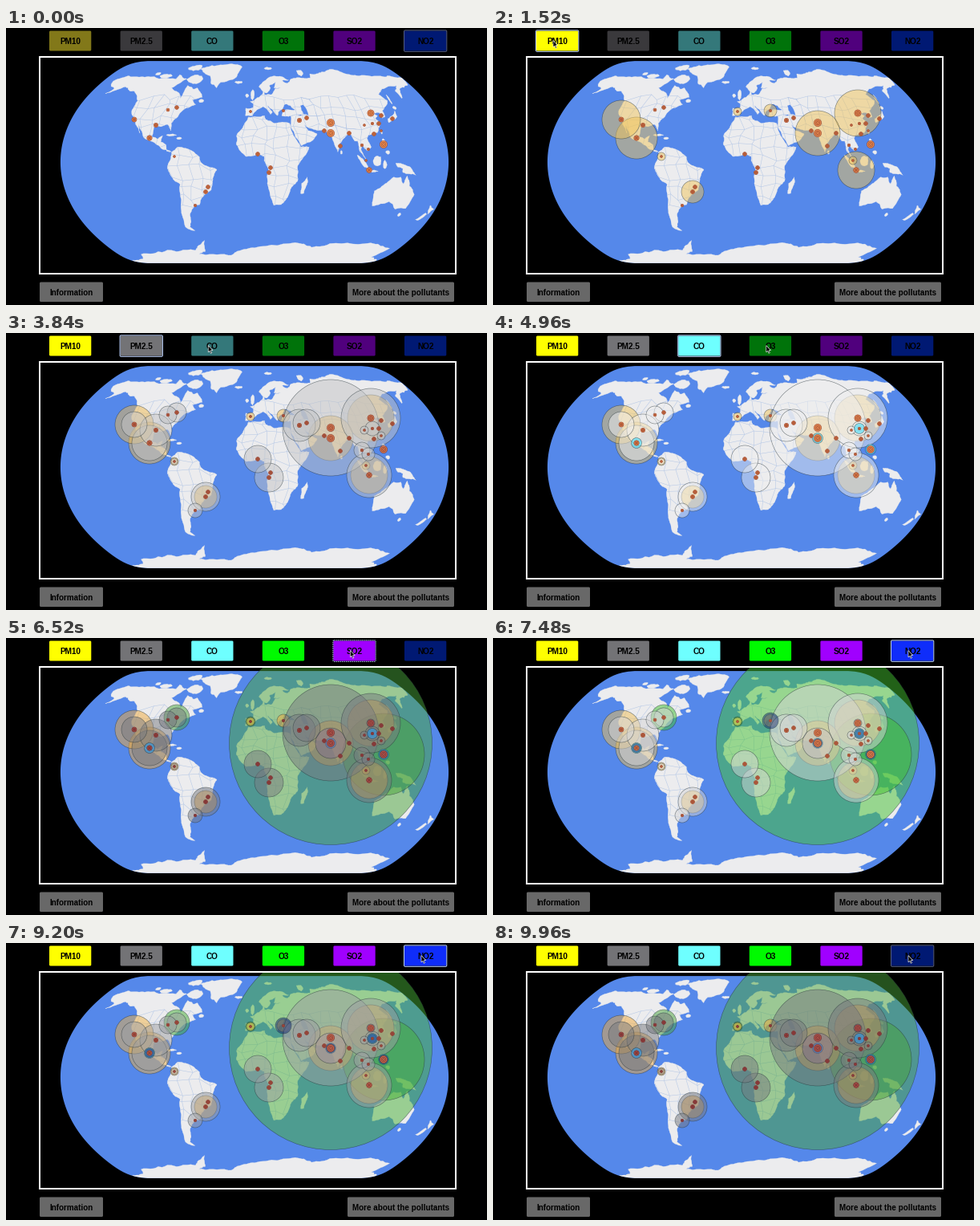
A matplotlib script for the animation above (10000 ms loop, 600x345 px).

```python
import numpy as np
import matplotlib.pyplot as plt
from matplotlib.animation import FuncAnimation
from matplotlib.collections import LineCollection, PatchCollection
from matplotlib.patches import Circle, FancyBboxPatch, Polygon, Rectangle

W, H, DPI = 600, 345, 100
STEP, FRAMES = 40, 250
PX = 72 / DPI
rng = np.random.default_rng(4)

fig = plt.figure(figsize=(W / DPI, H / DPI), dpi=DPI, facecolor="black")
ax = fig.add_axes([0, 0, 1, 1])
ax.set_xlim(0, W)
ax.set_ylim(H, 0)
ax.axis("off")


def rgb(*c):
    return np.array(c) / 255


OCEAN, LAND, BORDER = rgb(85, 136, 234), rgb(236, 236, 238), rgb(178, 198, 230)


def project(points):
    """Natural Earth projection from lon/lat to stage pixels."""
    l, p = np.radians(points).T
    p2 = p * p
    p4 = p2 * p2
    x = l * (0.8707 - 0.131979 * p2
             + p4 * (-0.013791 + p4 * (0.003971 * p2 - 0.001529 * p4)))
    y = p * (1.007226 + p2 * (0.015085 + p4
             * (-0.044475 + 0.028874 * p2 - 0.005916 * p4)))
    return np.column_stack([310 + 88.5 * x, 167 - 88.5 * y])


def rough(points, rounds=3, amount=.1):
    """Midpoint displacement turns a few key points into a coast."""
    for _ in range(rounds):
        step = np.roll(points, -1, axis=0) - points
        size = np.hypot(*step.T)
        push = rng.uniform(-amount, amount, len(points)) * np.minimum(1, 10 / size)
        mid = points + step / 2 + step[:, ::-1] * [-1, 1] * push[:, None]
        points = np.stack([points, mid], axis=1).reshape(-1, 2)
    return points


lats = np.linspace(-90, 90, 91)
rim = np.column_stack([np.full(91, 180), lats])
globe = Polygon(project(np.vstack([rim, -rim])), fc=OCEAN, ec="none")
ax.add_patch(globe)


def border_grid():
    """Jittered lon/lat grid that stands for country borders."""
    lon, lat = np.meshgrid(np.arange(-130, 150, 10.), np.arange(-36, 56, 8.))
    grid = np.stack([lon, lat], axis=-1) + rng.uniform(-3, 3, (*lon.shape, 2))
    rows = [*grid, *grid.transpose(1, 0, 2)]
    return [project(row) for row in rows]


grid = border_grid()


def coast(points, bordered=False):
    patch = Polygon(project(rough(points)), fc=LAND, ec=LAND, lw=.3 * PX)
    ax.add_patch(patch)
    patch.set_clip_path(globe)
    if bordered:
        lines = LineCollection(grid, colors=[BORDER], lw=.5 * PX, zorder=2)
        ax.add_collection(lines, autolim=False)
        lines.set_clip_path(patch)


def land(*coords, bordered=False):
    coast(np.array(coords, float).reshape(-1, 2), bordered)


def island(lon, lat, rx, ry):
    a = np.linspace(0, 2 * np.pi, 8, endpoint=False)
    size = rng.uniform(.85, 1.15, 8)
    coast(np.column_stack([lon + rx * size * np.cos(a), lat + ry * size * np.sin(a)]))


# North America, Greenland, South America
land(-168, 66, -156, 71, -128, 70, -95, 68, -94, 72, -82, 68, -94, 60, -82, 55,
     -79, 51, -77, 62, -69, 59, -65, 60, -56, 52, -66, 50, -61, 46, -70, 43,
     -76, 36, -81, 31, -80, 25, -84, 30, -97, 28, -97, 20, -91, 18.5, -87, 21,
     -88, 16, -83, 14, -82, 9, -77, 8, -85, 10, -95, 16, -105, 20, -113, 31,
     -109, 23, -117, 33, -124, 41, -123, 49, -133, 57, -147, 61, -163, 55,
     -158, 59, -165, 62, bordered=True)
land(-73, 78, -55, 71, -51, 64, -43, 60, -40, 65, -22, 70, -17, 80, -30, 83.5,
     -60, 82)
land(-77, 8, -72, 12, -62, 10.5, -51, 4, -50, 0, -35, -6, -39, -13, -41, -22,
     -48, -26, -54, -34, -58, -35, -65, -41, -66, -47, -69, -52, -65, -55,
     -74, -52, -73, -37, -70, -18, -76, -14, -81, -5, -78, 2, bordered=True)
# Africa
land(-6, 36, 10, 37, 11, 34, 20, 31, 34, 31, 37, 21, 43, 12, 51, 12, 40, -3,
     40.5, -15, 35, -20, 32, -28, 26, -34, 19, -34.5, 12, -17, 13, -6, 9, 1,
     9, 4.5, 2, 6, -8, 4.5, -17, 14, -17, 21, -10, 30, bordered=True)
land(49.3, -12, 50, -16, 47, -25, 44, -25, 44.3, -17)
# Europe
land(-9, 37, -9, 43, -1.5, 43.5, -1, 46, -4.5, 48.5, 2, 51, 8, 54, 10, 57.5,
     11, 54, 19, 54.5, 23.5, 59.5, 29, 60, 38, 64, 44, 68, 60, 69, 60, 45,
     47, 45, 49, 38, 36, 36.6, 27, 37, 29, 41, 41, 41.5, 37, 45, 31, 46, 28, 42,
     24, 40, 23, 37, 19, 41, 13, 45.5, 18, 40, 16, 38, 9, 44.3, 3, 42, -2, 37,
     bordered=True)
land(29, 60, 22, 60, 25, 65, 17, 62, 18, 60, 13, 55.5, 8, 58, 5, 61, 19, 70,
     30, 70.5, 41, 67, 33, 66.5, 38, 64)
# Asia
land(55, 68.5, 68, 69, 70, 73, 87, 75, 104, 77.5, 113, 74, 130, 71, 160, 70,
     180, 69, 177, 62.5, 163, 59, 157, 51, 156, 57, 163, 62, 143, 59, 135, 54.5,
     140, 49, 129, 41, 129, 36, 126, 35, 125, 39.5, 118, 39, 122, 37, 119, 35,
     122, 30, 117, 23.5, 108, 21.6, 90, 25, 70, 28, 53.8, 37, 51, 45, 48, 55,
     bordered=True)
land(108, 22, 106, 19, 109, 12, 105, 9, 100.5, 13.4, 99.3, 10, 104, 1.3,
     98.5, 8, 97, 17, 94, 17, 91, 22.5, 87, 21, 80, 15, 77.5, 8, 72.6, 21,
     67, 25, 57, 26, 48.2, 30, 51.5, 25, 59.5, 22.4, 55, 17.5, 44, 13, 35, 28,
     36, 36.6, 49, 38, 54, 36.8, 62, 40, 90, 30, bordered=True)
land(130.5, 31.5, 136, 33.6, 141, 36, 141.5, 41, 137, 37, 131, 34.4)
land(95.3, 5.6, 104, -1.5, 105.8, -5.8, 102, -4)
# Oceania, Antarctica
land(131, -.8, 138, -1.7, 145, -4.3, 150.5, -10.5, 138, -8.3, 137.8, -5.3, 133, -4)
land(114, -23, 122, -18, 130, -12, 136.5, -12, 140, -17.5, 142.5, -11, 146, -19,
     153, -26, 150, -37, 140, -37.5, 136, -34, 131, -31.5, 116, -35)
land(172.8, -34.5, 178.4, -37.7, 175.2, -41.5, 173.8, -39.3)
land(172.7, -40.6, 174.2, -41.7, 169, -46.6, 166.5, -46)
land(-180, -84.7, -155, -81, -150, -77, -115, -74, -75, -73, -67, -68, -58, -63.5,
     -63, -74, -75, -77, -35, -78, -20, -73.5, 0, -70.5, 55, -66.5, 70, -70,
     90, -66.5, 145, -67, 168, -71, 160, -80, 180, -84.7, 180, -90, -180, -90)

for spot in ((-72, 68, 9, 4), (-110, 71, 7, 2), (-80, 79, 9, 3), (-122, 73, 3, 1.5),
             (-56, 49, 2.5, 1.5), (-79, 21.7, 4.5, .8), (-71, 19, 2.5, .8),
             (-18.5, 65, 4.5, 1.2), (-2, 54, 2, 4), (-8, 53.3, 1.7, 1.5),
             (18, 78.5, 5, 1.5), (58, 74, 4, 3), (143, 43.3, 2, 1.3),
             (142.7, 50, .8, 4), (121, 23.7, .7, 1.4), (80.8, 7.7, .9, 1.5),
             (121.3, 16, 1.5, 2.5), (124, 7.8, 1.8, 1.5), (114, 1, 4, 4),
             (121, -2, 1.7, 3.3), (110, -7.3, 4.5, .8), (146.7, -42, 1.6, 1.4)):
    island(*spot)

box = Rectangle((42.3, 36.3), 518.6, 270, fc="none", ec="white", lw=2 * PX, zorder=6)
ax.add_patch(box)

# City: x, y, then bubble radii for PM10, PM2.5, O3
CITIES = {
    "Los Angeles": (160, 114, 24, 16), "Mexico City": (179, 137, 26, 22),
    "Houston": (187, 121, 0, 20), "Chicago": (202, 102, 0, 11),
    "New York": (213, 99, 0, 12, 16), "Bogota": (210, 160, 5, 4),
    "Sao Paulo": (249, 204, 14, 18), "Buenos Aires": (236, 221, 0, 9),
    "Madrid": (305, 104, 5, 0, 6), "Istanbul": (346, 103, 8),
    "Lagos": (314, 157, 0, 17), "Luanda": (328, 180, 0, 18),
    "Baghdad": (366, 115, 0, 20), "Tehran": (375, 112, 0, 17),
    "Lahore": (405, 118, 0, 60), "Ahmedabad": (405, 131, 28, 0, 126.5),
    "Beijing": (455, 106, 29, 37), "Chengdu": (447, 121, 0, 5),
    "Wuhan": (457, 119, 0, 9), "Taipei": (468, 128, 0, 5),
    "Manila": (471, 145, 0, 0, 51), "Bangkok": (444, 146, 0, 10),
    "Saigon": (452, 151, 0, 8), "Singapore": (449, 165, 5),
    "Jakarta": (453, 177, 23, 28),
}
QUIET = [(428, 131), (397, 128), (417, 147), (465, 119), (468, 109), (482, 113),
         (459, 132), (330, 174), (252, 198)]


def column(k):
    return [(*c[:2], c[k]) for c in CITIES.values() if len(c) > k and c[k]]


def spots(r, *names):
    return [(*CITIES[n][:2], r) for n in names]


# Label, idle and active button, dark and light fill, alpha, click time, bubbles
LAYERS = [
    ("PM10", rgb(130, 120, 25), rgb(255, 255, 0), rgb(240, 170, 60),
     rgb(240, 200, 95), .5, 1320, column(2)),
    ("PM2.5", rgb(58, 57, 60), rgb(115, 115, 118), rgb(118, 120, 126),
     rgb(250, 250, 250), .5, 2640, column(3)),
    ("CO", rgb(52, 120, 122), rgb(110, 255, 255), rgb(40, 150, 230),
     rgb(70, 225, 250), .6, 3920,
     spots(6.5, "Mexico City", "Ahmedabad", "Wuhan", "Manila")),
    ("O3", rgb(0, 115, 10), rgb(0, 250, 0), rgb(75, 165, 60),
     rgb(65, 205, 45), .5, 5160, column(4)),
    ("SO2", rgb(80, 0, 125), rgb(160, 0, 255), rgb(125, 95, 150),
     rgb(235, 230, 240), .35, 6440,
     spots(19, "Ahmedabad") + spots(5, "Beijing", "Manila")),
    ("NO2", rgb(0, 25, 115), rgb(15, 45, 250), rgb(20, 40, 120),
     rgb(30, 60, 120), .5, 7320,
     spots(10, "Istanbul") + spots(5.5, "Mexico City", "Ahmedabad", "Wuhan", "Manila")),
]
OZONE, LAST, NO2_OFF = 3, 5, 9280

# Ozone lies under the other layers, wide bubbles under narrow ones
bubbles = sorted(((x, y, r, k) for k, layer in enumerate(LAYERS)
                  for x, y, r in layer[-1]),
                 key=lambda b: (b[3] != OZONE, b[3], -b[2]))
owner = np.array([b[3] for b in bubbles])
discs = PatchCollection([Circle(b[:2], b[2]) for b in bubbles], lw=.6 * PX, zorder=3)
ax.add_collection(discs, autolim=False)
discs.set_clip_path(box)

# Markers grow with the worst reading of their city
markers = [(x, y, min(1 + max(radii) / 12, 4.6)) for x, y, *radii in CITIES.values()]
markers += [(x, y, 2.4) for x, y in QUIET]
dots = PatchCollection([Circle((x, y), r * s) for x, y, r in markers
                        for s in ((1, .62, .28) if r > 2.3 else (1, .4))],
                       lw=.6 * PX, zorder=4)
ax.add_collection(dots, autolim=False)


def button(x, y, w, h, label, color, size):
    patch = FancyBboxPatch((x, y), w, h, fc=color, ec="none", zorder=7,
                           boxstyle="round,pad=0,rounding_size=1.5")
    ax.add_patch(patch)
    ax.text(x + w / 2, y + h / 2 + .5, label, size=size * PX, weight="bold",
            family="Liberation Sans", ha="center", va="center_baseline", zorder=8)
    return patch


def left(k):
    return 54 + 88.6 * k


buttons = [button(left(k), 3.5, 52.3, 25, layer[0], layer[1], 10)
           for k, layer in enumerate(LAYERS)]
GRAY = rgb(104, 104, 104)
button(42, 316.5, 79, 24.5, "Information", GRAY, 9.9)
button(426, 316.5, 133, 24.5, "More about the pollutants", GRAY, 9.9)
focus = FancyBboxPatch((0, 2.9), 53.3, 26.4, fc="none", lw=1 * PX, zorder=7,
                       boxstyle="round,pad=0,rounding_size=1.5")
ax.add_patch(focus)

ARROW = np.array([(0, 0), (0, 8.4), (1.9, 6.8), (3.2, 9.8), (4.5, 9.2),
                  (3.2, 6.3), (5.8, 6.1)])
cursor = Polygon(ARROW, fc="black", ec="white", lw=.6 * PX, zorder=9)
ax.add_patch(cursor)


def pointer(t):
    """Glide to each button in turn and rest there for the click."""
    pos = np.array([72., -14.])
    for k, layer in enumerate(LAYERS):
        u = np.clip((t - layer[6] + 700) / 500, 0, 1)
        goal = np.array([left(k) + 21, 15.5])
        pos = pos + (goal - pos) * u * u * (3 - 2 * u)
    return pos


def update(i):
    t = i * STEP
    clicked = sum(t >= layer[6] for layer in LAYERS)
    glow = .5 + .5 * np.cos(2 * np.pi * (t - 8100) / 3480) if clicked else 1
    fills, lines = [], []
    for k, (_, idle, lit, dark, light, alpha, *_) in enumerate(LAYERS):
        on = k < clicked and not (k == LAST and t >= NO2_OFF)
        buttons[k].set_facecolor(lit if on else idle)
        fills.append([*(dark + (light - dark) * glow), alpha * on])
        lines.append([.15, .2, .22, .6 * on])
    discs.set_facecolor(np.array(fills)[owner])
    discs.set_edgecolor(np.array(lines)[owner])

    low, high = rgb(178, 88, 78), rgb(238, 150, 85)
    dots.set_facecolor(low + (high - low) * glow)
    dots.set_edgecolor(rgb(110, 40, 45) + rgb(50, 30, 0) * glow)

    active = clicked - 1 if clicked else LAST
    dim = not clicked or t >= NO2_OFF
    focus.set_x(left(active) - .5)
    focus.set_edgecolor(rgb(85, 95, 130) if dim else rgb(190, 212, 255))
    focus.set_linestyle((0, (1.5, 1)) if LAYERS[active][0] == "SO2" else "-")
    cursor.set_xy(ARROW + pointer(t))
    return discs, dots, focus, cursor


anim = FuncAnimation(fig, update, frames=FRAMES, interval=STEP,
                     init_func=lambda: update(0), repeat=True, blit=False)
plt.show()
```
